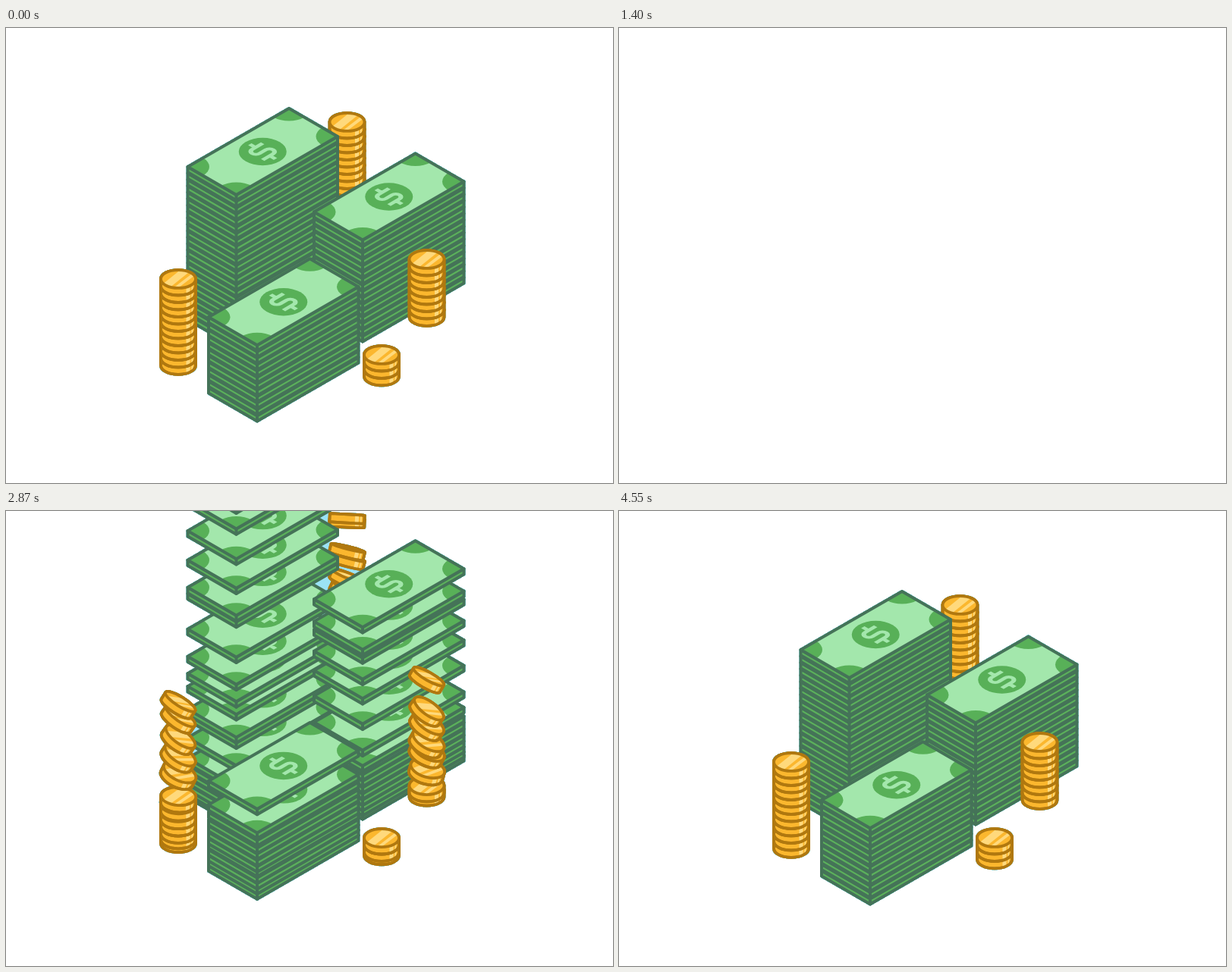
Animation of 800x600 px, one loop 4620 ms. Source, as an HTML page with a canvas:

```html
<!DOCTYPE html>
<html lang="en">
<head>
<meta charset="utf-8">
<title>Money stacks</title>
<style>
html, body { margin: 0; width: 100%; height: 100%; overflow: hidden; background: #fff; }
canvas { display: block; width: 800px; height: 600px; }
</style>
</head>
<body>
<canvas id="stage" width="800" height="600"></canvas>
<script>
const W = 800, H = 600, LOOP = 4620, STEP = 70;
const EMPTY_FROM = 1400, EMPTY_TO = 1960;
const ctx = document.getElementById('stage').getContext('2d', { willReadFrequently: true });

const SKY = [155, 227, 245];
const EDGE = '#457358', SIDE = '#5bb05b', PAPER = '#a3e7ac', INK = '#58b058';
const RIM = '#b0780f', GOLD = '#fbb72e', SHINE = '#ffd97c';

// Bill geometry, measured from its left corner.
const TOP = [133.5, -77], RIGHT = [197.5, -40], BOTTOM = [64, 37];
const BILL_H = 7.3, BILL_GAP = 8.45, BILL_LINE = 4;
const COIN_R = 23, COIN_H = 11, COIN_GAP = 9.5, COIN_OPEN = 0.52;
const dollar = new Path2D('M9-9H-4a4.5 4.5 0 0 0 0 9H4a4.5 4.5 0 0 1 0 9H-9M0-16V-9M0 9V16');

// In painting order; x, y place the topmost item, lag delays the whole stack.
const stacks = [
  { kind: 'coin', x: 449.5, y: 124, count: 12, lag: 230 },
  { kind: 'bill', x: 239.5, y: 183, count: 24, lag: 45 },
  { kind: 'bill', x: 406, y: 242.5, count: 16, lag: 10 },
  { kind: 'coin', x: 227, y: 331, count: 12, lag: 40 },
  { kind: 'bill', x: 267, y: 381.2, count: 12, lag: -45 },
  { kind: 'coin', x: 554.5, y: 305, count: 8, lag: 130 },
  { kind: 'coin', x: 495, y: 431, count: 3, lag: 105 }
];

// Seeded random numbers from -1 to 1.
let seed = 7;
function jitter() {
  seed = seed * 16807 % 2147483647;
  return seed / 1073741823.5 - 1;
}

// Items go one after another from the lowest up; the first one has a clear lead.
for (const s of stacks) {
  s.items = Array.from({ length: s.count }, (_, i) => {
    const lead = 0.2 ** i, loose = i ? 1 : 0;
    return {
      out: 560 + 14 * i + 0.15 * i * i - 60 * lead + s.lag / 2 + 14 * loose * jitter(),
      land: 2740 + 12 * i + 0.62 * i * i - 170 * lead + s.lag + 20 * loose * jitter()
    };
  });
}

function dropping(t, start) {
  return t > start ? (0.058 * (t - start)) ** 2 : 0;
}

// Fall, a slight squash, then two rebounds.
function arriving(t, land, i) {
  const v = t - land;
  if (v < 0) return 0.6 * v - 0.00035 * v * v;
  if (v < 80) return i / 11 * Math.sin(Math.PI * v / 80);
  const wave = Math.sin(Math.PI * ((v - 80) % 440) / 440);
  return v < 520 ? -7 * wave : v < 960 ? -1.2 * wave : 0;
}

// How far a coin's face opens and how it tilts, by time left until it lands.
function pose(left) {
  const u = Math.max(0, left);
  return {
    open: COIN_OPEN * Math.cos(Math.PI * u / 430) * Math.exp(-((u / 300) ** 2)),
    tilt: Math.PI / 3 * Math.sin(Math.PI * u / 230) * Math.exp(-u / 200)
  };
}

function polygon(...points) {
  ctx.beginPath();
  points.forEach(p => ctx.lineTo(p[0], p[1]));
  ctx.closePath();
}

function paint(fill, line, width) {
  ctx.fillStyle = fill;
  ctx.fill();
  ctx.strokeStyle = line;
  ctx.lineWidth = width;
  ctx.stroke();
}

function oval(x, y, rx, ry) {
  ctx.beginPath();
  ctx.ellipse(x, y, rx, ry, 0, 0, Math.PI * 2);
}

function drawBill(x, y) {
  const low = p => [p[0], p[1] + BILL_H], zero = [0, 0];
  ctx.save();
  ctx.translate(x, y);
  polygon(zero, BOTTOM, RIGHT, low(RIGHT), low(BOTTOM), low(zero));
  paint(SIDE, EDGE, BILL_LINE);
  polygon(BOTTOM, low(BOTTOM));
  ctx.stroke();

  polygon(zero, TOP, RIGHT, BOTTOM);
  ctx.fillStyle = PAPER;
  ctx.fill();
  ctx.save();
  ctx.clip();
  ctx.fillStyle = INK;
  for (const p of [zero, TOP, RIGHT, BOTTOM]) {
    oval(p[0], p[1], 28.5, 16.5);
    ctx.fill();
  }
  const cx = RIGHT[0] / 2, cy = RIGHT[1] / 2;
  oval(cx, cy, 31.5, 18.2);
  ctx.fill();
  ctx.transform(0.866, -0.5, 0.866, 0.5, cx, cy);
  ctx.scale(1.22, 1.22);
  ctx.strokeStyle = PAPER;
  ctx.lineWidth = 4.2;
  ctx.stroke(dollar);
  ctx.restore();

  polygon(zero, TOP, RIGHT, BOTTOM);
  ctx.strokeStyle = EDGE;
  ctx.lineWidth = BILL_LINE;
  ctx.stroke();
  ctx.restore();
}

function drawCoin(x, y, { open, tilt }) {
  const ry = COIN_R * Math.abs(open), h = COIN_H * Math.sqrt(1 - open * open) / 2;
  ctx.save();
  ctx.translate(x, y);
  ctx.rotate(tilt);
  if (open < 0) ctx.scale(1, -1);

  const body = () => {
    ctx.beginPath();
    ctx.ellipse(0, -h, COIN_R, ry, 0, Math.PI, Math.PI * 2);
    ctx.ellipse(0, h, COIN_R, ry, 0, 0, Math.PI);
    ctx.closePath();
  };
  body();
  paint(GOLD, RIM, 3.8);
  ctx.save();
  ctx.clip();
  ctx.fillStyle = SHINE;
  ctx.fillRect(10.5, -h, 5, 2 * h + ry);
  ctx.fillRect(17.5, -h, 1.8, 2 * h + ry);
  ctx.restore();
  body();
  ctx.stroke();

  if (ry > 1) {
    oval(0, -h, COIN_R, ry);
    ctx.fillStyle = GOLD;
    ctx.fill();
    ctx.save();
    ctx.clip();
    ctx.translate(0, -h);
    ctx.scale(1, ry / 12);
    ctx.fillStyle = SHINE;
    polygon([-22, 8], [4, -13], [19, -13], [-12, 12]);
    ctx.fill();
    polygon([-8, 13], [22, -10], [26, -8], [-3, 14]);
    ctx.fill();
    ctx.restore();
    oval(0, -h, COIN_R, ry);
    ctx.stroke();
  }
  ctx.restore();
}

function drawStack(s, t) {
  const bill = s.kind === 'bill', gap = bill ? BILL_GAP : COIN_GAP;
  const leaving = t < EMPTY_FROM;
  let below = Infinity;
  s.items.forEach((item, i) => {
    const shift = leaving ? dropping(t, item.out) : arriving(t, item.land, i);
    // Neighbours may squeeze together but never pass each other.
    const y = Math.min(s.y + (s.count - 1 - i) * gap + shift, below - 4);
    below = y;
    if (y < -80 || y > H + 90) return;
    if (bill) drawBill(s.x, y);
    else drawCoin(s.x, y + 4.7, pose(leaving ? 0 : item.land - t));
  });
}

// Turns the open backdrop white; enclosed pockets keep the sky colour.
function clearOutside() {
  const image = ctx.getImageData(0, 0, W, H), d = image.data;
  const todo = [0, W - 1, W * (H - 1), W * H - 1];
  while (todo.length) {
    const p = todo.pop(), k = p * 4;
    const far = Math.abs(d[k] - SKY[0]) + Math.abs(d[k + 1] - SKY[1]) + Math.abs(d[k + 2] - SKY[2]);
    if (far > 40) continue;
    d[k] = d[k + 1] = d[k + 2] = 255;
    const x = p % W;
    if (x > 0) todo.push(p - 1);
    if (x < W - 1) todo.push(p + 1);
    if (p >= W) todo.push(p - W);
    if (p < W * (H - 1)) todo.push(p + W);
  }
  ctx.putImageData(image, 0, 0);
}

function draw(t) {
  const empty = t >= EMPTY_FROM && t < EMPTY_TO;
  ctx.fillStyle = empty ? '#fff' : `rgb(${SKY})`;
  ctx.fillRect(0, 0, W, H);
  if (empty) return;
  ctx.lineJoin = 'round';
  stacks.forEach(s => drawStack(s, t));
  clearOutside();
}

const begin = performance.now();
let shown = -1;
function tick() {
  const t = Math.floor((performance.now() - begin) % LOOP / STEP) * STEP;
  if (t !== shown) draw(shown = t);
  requestAnimationFrame(tick);
}
tick();
</script>
</body>
</html>
```
